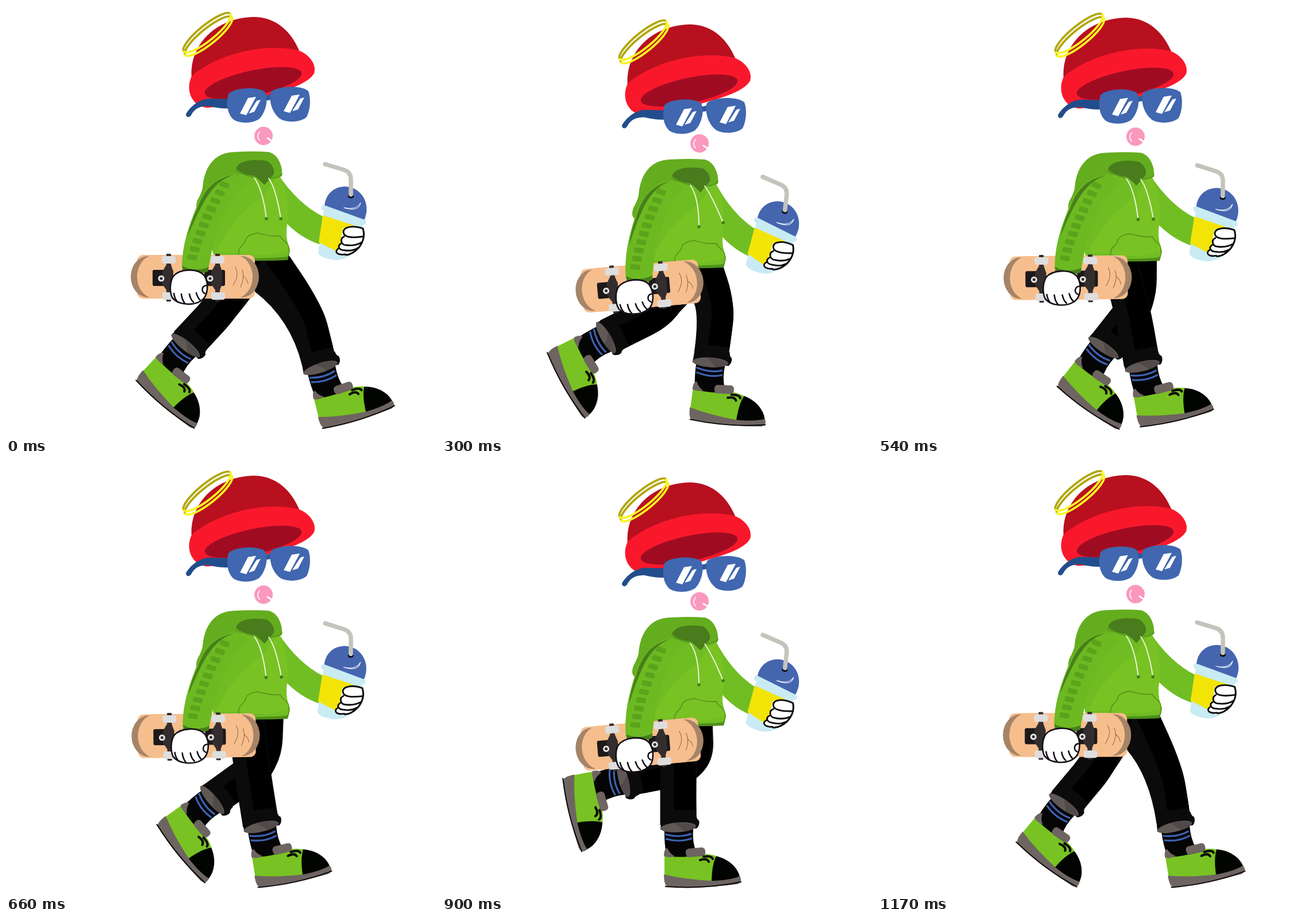
Recreate the animation shown at these times as an HTML page with a canvas. Size 748x748 px, loop 1200 ms.

```html
<!DOCTYPE html>
<html lang="en">
<head>
<meta charset="utf-8">
<title>Walk cycle</title>
<style>
  html, body { margin: 0; width: 100%; height: 100%; overflow: hidden; background: #fff; }
  canvas { display: block; width: 100vw; height: 100vh; }
</style>
</head>
<body>
<canvas id="stage" width="748" height="748"></canvas>
<script>
const ctx = document.getElementById('stage').getContext('2d');
const LOOP = 1200, STEP = 30, BOB = 13;
const DEG = Math.PI / 180;
const INK = '#0b0909';

function fill(path, color) {
  ctx.fillStyle = color;
  ctx.fill(new Path2D(path));
}
function line(path, color, width, cap = 'round') {
  ctx.strokeStyle = color;
  ctx.lineWidth = width;
  ctx.lineCap = cap;
  ctx.lineJoin = 'round';
  ctx.stroke(new Path2D(path));
}
function oval(x, y, rx, ry, color, turn = 0) {
  ctx.fillStyle = color;
  ctx.beginPath();
  ctx.ellipse(x, y, rx, ry, turn * DEG, 0, 7);
  ctx.fill();
}
function box(x, y, w, h, r, color) {
  ctx.fillStyle = color;
  ctx.beginPath();
  ctx.roundRect(x, y, w, h, r);
  ctx.fill();
}
function group(x, y, turn, draw) {
  ctx.save();
  ctx.translate(x, y);
  ctx.rotate(turn * DEG);
  draw();
  ctx.restore();
}
function swing(px, py, turn, draw) {
  group(px, py, turn, () => { ctx.translate(-px, -py); draw(); });
}

// Each key: time, cuff x, cuff y, shin angle.
const farLeg = [
  [0, 549, 629, -14], [180, 504, 631, -4], [420, 432, 604, 22], [660, 360, 586, 54],
  [900, 316, 551, 79], [1050, 426, 597, 36], [1170, 518, 631, -9]
];
const nearLeg = [
  [0, 314, 592, 43], [180, 296, 594, 54], [275, 283, 578, 65], [420, 348, 593, 36],
  [570, 472, 630, -14], [660, 446, 631, -9], [900, 413, 632, 0], [1050, 362, 604, 22],
  [1170, 325, 594, 40]
];

// Periodic monotone cubic, so the extremes stay on the keys.
function poseAt(keys, t) {
  const n = keys.length;
  const key = i => {
    const k = keys[(i + n) % n];
    return [k[0] + Math.floor(i / n) * LOOP, ...k.slice(1)];
  };
  let i = n - 1;
  while (keys[i][0] > t) i--;
  const slope = (j, c) => {
    const a = key(j), b = key(j + 1);
    return (b[c] - a[c]) / (b[0] - a[0]);
  };
  const tangent = (j, c) => {
    const s = slope(j - 1, c), e = slope(j, c);
    return s * e <= 0 ? 0 : 2 * s * e / (s + e);
  };
  const a = key(i), b = key(i + 1), h = b[0] - a[0], u = (t - a[0]) / h;
  return [1, 2, 3].map(c =>
    a[c] * (1 + 2 * u) * (1 - u) ** 2 + b[c] * u * u * (3 - 2 * u) +
    h * (tangent(i, c) * u * (1 - u) ** 2 + tangent(i + 1, c) * u * u * (u - 1)));
}

function foot() {
  fill('M-26 2L24 2Q22 25 29 42L10 54L-22 54Q-27 25 -26 2Z', '#050505');
  line('M-25 12Q0 19 21 11M-24 20Q0 27 22 19', '#3d63b3', 3.2, 'butt');
  fill('M-26 48Q-15 53 14 51Q40 42 64 50L60 98L-26 95Z', '#79c223');
  fill('M64 50Q88 56 100 74Q107 86 105 93L56 97Q56 66 64 50Z', '#020402');
  fill('M-27 82Q10 91 57 93Q88 92 105 85Q111 96 100 99Q45 106 -18 104Q-27 104 -27 82Z', '#6e6461');
  line('M-24 103Q45 108 107 95', INK, 2);
  fill('M-27 50Q-27 37 -21 36Q-17 46 -8 50Q-18 54 -27 50Z', '#6e6461');
  group(28, 43, -5, () => box(-17, -7, 34, 15, 6, '#6e6461'));
  line('M36 57Q48 53 51 60M42 51Q56 49 58 55', INK, 4);
}

// side: -1 joins the crotch along the back of the leg, 1 along the front.
function leg(keys, hipX, width, side, bob, t) {
  const [x, y, turn] = poseAt(keys, t);
  const s = Math.sin(turn * DEG), c = Math.cos(turn * DEG);
  const shin = 100 + Math.max(0, turn - 36) * 0.7;
  const hipY = 432 + bob;
  hipX -= Math.max(0, turn - 50) * 0.5;
  group(x, y, turn, foot);

  const point = (across, up) => [x + across * c + up * s, y + across * s - up * c];
  const pants = (color, w, shift, lift) => {
    const [kx, ky] = point(shift, shin), [ex, ey] = point(shift, lift);
    const hx = hipX + shift;
    line(`M${hx} ${hipY}L${(hx + kx) / 2} ${(hipY + ky) / 2}` +
      `Q${kx} ${ky} ${kx * 0.6 + ex * 0.4} ${ky * 0.6 + ey * 0.4}L${ex} ${ey}`, color, w, 'butt');
  };
  const edge = side * width / 2 - 2;
  fill(`M${hipX} ${hipY}L433 ${hipY + 8}L433 ${497 + bob}` +
    `Q${point(edge, shin - 5)} ${point(edge, 12)}L${point(0, 12)}L${point(0, shin)}Z`, '#0b0b0b');
  pants('#0b0b0b', width, -2, 4);
  pants('#000', 38, 9, 30);
  group(x, y, turn, () => {
    fill('M-31 -22L29 -22Q30 -14 34 -12Q36 -4 30 2L-33 4Z', '#0b0b0b');
    oval(-2, 0, 31, 8.5, '#5f5855', -4);
    fill('M-10 -8Q16 -9 29 -2Q20 6 8 7Q0 -2 -10 -8Z', '#504a48');
  });
}

function cup() {
  fill('M472 291Q508 345 553 367L547 415Q512 404 484 374Z', '#70be23');
  fill('M553 355L622 379L600 432Q586 445 566 441Q548 438 543 430Z', '#c9ebf3');
  fill('M551 364L619 386L604 426L583 431L544 411Z', '#f3e408');
  fill('M554 349C555 328 570 314 590 314C616 315 630 338 627 359Q626 367 622 375Z', '#4565af');
  line('M553 351L622 376', '#c9ebf3', 9);
  line('M588 351Q610 356 617 342Q614 359 588 351', '#fff', 1);
  oval(600, 331, 5, 3.5, '#000');
  line('M555 275L588 285Q600 289 600 302L600 328', '#c4c4bc', 7.5);
  fill('M586 387Q606 379 621 388Q626 404 614 420Q599 438 580 432Q570 427 581 418Z', '#fff');
  line('M621 388Q626 404 614 420Q602 433 591 433', INK, 3);
  line('M621 387C603 381 586 384 587 394C588 404 607 403 621 401' +
    'M588 401C580 405 583 416 592 416Q607 418 619 411' +
    'M583 413C575 418 580 425 589 425Q602 427 612 421' +
    'M578 422C570 428 577 434 590 432', INK, 2.8);
}

function hoodie(k) {
  fill('M345 303Q342 323 333 338Q328 352 335 357L380 370L410 280Z', '#64ad1f');
  fill('M385 292Q430 280 474 292Q493 325 490 375Q484 400 494 425L490 441L366 441L360 430Q352 385 350 340Z', '#70bd23');
  fill('M474 292Q493 325 490 375Q484 400 494 425L490 436L364 434Q385 375 448 330Z', '#79c223');
  fill('M364 434L492 434L490 442Q430 445 365 441Z', '#4f8f1b');
  fill('M364 429L405 429Q450 441 492 425L490 436Q450 441 364 437Z', '#70bd23');
  line('M405 432C402 417 417 416 417 406C421 397 432 396 439 395Q460 402 477 400C481 410 493 411 492 422Q494 431 490 436', '#4d881a', 1.3);
  fill('M342 316C345 280 362 255 397 254Q432 252 457 254C475 258 482 282 480 296Q466 303 456 301L449 312L432 293Q388 288 352 321Z', '#64ad1f');
  fill('M400 283C406 266 438 266 455 270Q468 280 466 292L450 311L433 296Q412 294 400 283Z', '#497c1c');
  line('M400 286Q420 297 435 298M480 292Q474 300 462 299', '#559a1b', 2);

  const lx = 453 - 6 * k, ly = 370 + k, rx = 478 + 11 * k, ry = 370 - 6 * k;
  line(`M432 299Q447 320 ${lx} ${ly}M457 300Q470 318 ${rx} ${ry}`, '#f4f8e9', 1.8);
  oval(lx, ly, 2.8, 2.8, '#3f7e1b');
  oval(rx, ry, 2.8, 2.8, '#3f7e1b');
}

function truck(x, hubX) {
  box(x - 4, 431, 8, 83, 1, '#332d2e');
  box(x < 300 ? 255 : 345, 459, 36, 28, 3, '#1d1819');
  fill(`M${x - 11} 462L${x - 4} 450L${x + 4} 450L${x + 8} 462L${x + 8} 484L${x + 4} 494L${x - 4} 494L${x - 11} 484Z`, '#332d2e');
  oval(hubX, 474, 5.5, 5.5, '#e4e4e1');
  oval(hubX, 474, 2.5, 2.5, '#332d2e');
  box(x - 12, 435, 24, 13, 4, '#dedede');
  box(x - 11, 498, 24, 13, 4, '#dedede');
}

function board() {
  box(228, 433, 205, 76, 10, '#f7be8d');
  const ends = [[247, 1], [410, -1]];
  for (const [x, side] of ends) {
    oval(x, 471, 30, 36, '#a58468');
    oval(x + 12 * side, 471, 31, 38, '#f7be8d');
  }
  box(250, 433, 158, 76, 2, '#f7be8d');
  line('M399 454Q407 468 395 486M411 459Q416 472 408 489M412 469Q420 475 421 483', '#8a664a', 1);
  truck(283, 270);
  truck(368, 355);
}

function sleeve() {
  fill('M398 291C360 298 342 322 331 350C319 382 307 410 306 455Q328 467 351 461C358 430 361 400 386 352Q402 320 425 304Z', '#6cb922');
  fill('M398 293C360 300 344 322 333 352Q320 378 317 399Q327 372 342 345C357 318 372 301 398 293Z', '#487f1b');
  for (let i = 0; i < 10; i++) {
    const u = i / 9;
    group(380 - 76 * u + 20 * u * u, 311 + 126 * u, 22 - 12 * u,
      () => box(-8.5, -4.5, 17, 9, 2.5, '#5ba31b'));
  }
  fill('M307 452Q328 464 353 454L351 462Q328 470 307 461Z', '#458019');
}

function fist() {
  const outline = 'M291 470C302 457 333 455 345 469C354 484 351 506 339 513C325 522 298 520 289 507C284 496 285 480 291 470Z';
  fill(outline, '#fff');
  line(outline, '#150f18', 2.6);
  line('M292 500Q293 508 297 513M305 501Q306 511 311 517M319 501Q321 511 326 515M331 499Q333 507 338 512' +
    'M350 486C340 486 339 497 346 500', '#150f18', 2.6);
}

function hat() {
  fill('M323 127C317 68 365 20 432 19C472 20 497 46 511 80L430 120Z', '#b8101f');
  fill('M323 122C365 85 450 62 511 78C533 88 540 106 536 117C526 135 490 146 450 157Q400 174 350 177C324 175 311 147 323 122Z', '#f9182b');
  oval(430, 134, 86, 22, '#9f0c22', -12);
}

function halo() {
  const arcs = (from, color) => {
    for (const side of [-1, 1]) {
      ctx.beginPath();
      ctx.ellipse(351 + 1.2 * side, 49.5 + 3 * side, 52, 13.5, -39 * DEG, from, from + Math.PI);
      ctx.strokeStyle = color;
      ctx.lineWidth = 3.8;
      ctx.stroke();
    }
  };
  arcs(Math.PI, '#b1a70d');
  arcs(0, '#faf520');
}

function glasses() {
  fill('M390 162L352 161C334 163 320 176 313 188C313 195 320 194 322 190C329 177 338 174 352 174Q370 179 390 178Z', '#224d8c');
  line('M446 159Q456 162 464 156', '#2f589e', 9);
  fill('M387 153C397 142 438 139 451 150C457 165 451 185 441 196C428 206 404 204 395 197C384 186 383 168 387 153Z', '#4067af');
  fill('M461 149C475 139 512 137 526 148C531 162 529 181 523 193C512 203 489 203 478 197C464 188 456 166 461 149Z', '#4067af');
  const glint = 'M421 160L435 158L418 190L407 187ZM436 165L443 163L432 184L422 187Z';
  fill(glint, '#fff');
  group(76, -4, 0, () => fill(glint, '#fff'));
}

function bubble() {
  oval(448, 226, 16, 16, '#fa98bd');
  line('M441 219Q435 227 441 234', '#fff', 1.6);
  line('M455 230L461 234', '#fff', 3);
}

function render(t) {
  const k = (1 - Math.cos(2 * Math.PI * t / 600)) / 2;
  const bob = BOB * k;
  ctx.fillStyle = '#fff';
  ctx.fillRect(0, 0, 748, 748);

  leg(farLeg, 457, 60, -1, bob, t);
  leg(nearLeg, 417, 63, 1, bob, t);
  group(0, bob, 0, () => {
    swing(475, 305, 6.5 * k, cup);
    hoodie(k);
    swing(375, 300, -5 * k, () => { board(); sleeve(); fist(); });
    hat();
    halo();
    bubble();
  });
  group(0, bob * 1.5, 0, glasses);
}

const start = performance.now();
function tick() {
  const elapsed = (performance.now() - start) % LOOP;
  render(Math.floor(elapsed / STEP) * STEP);
  requestAnimationFrame(tick);
}
tick();
</script>
</body>
</html>
```
